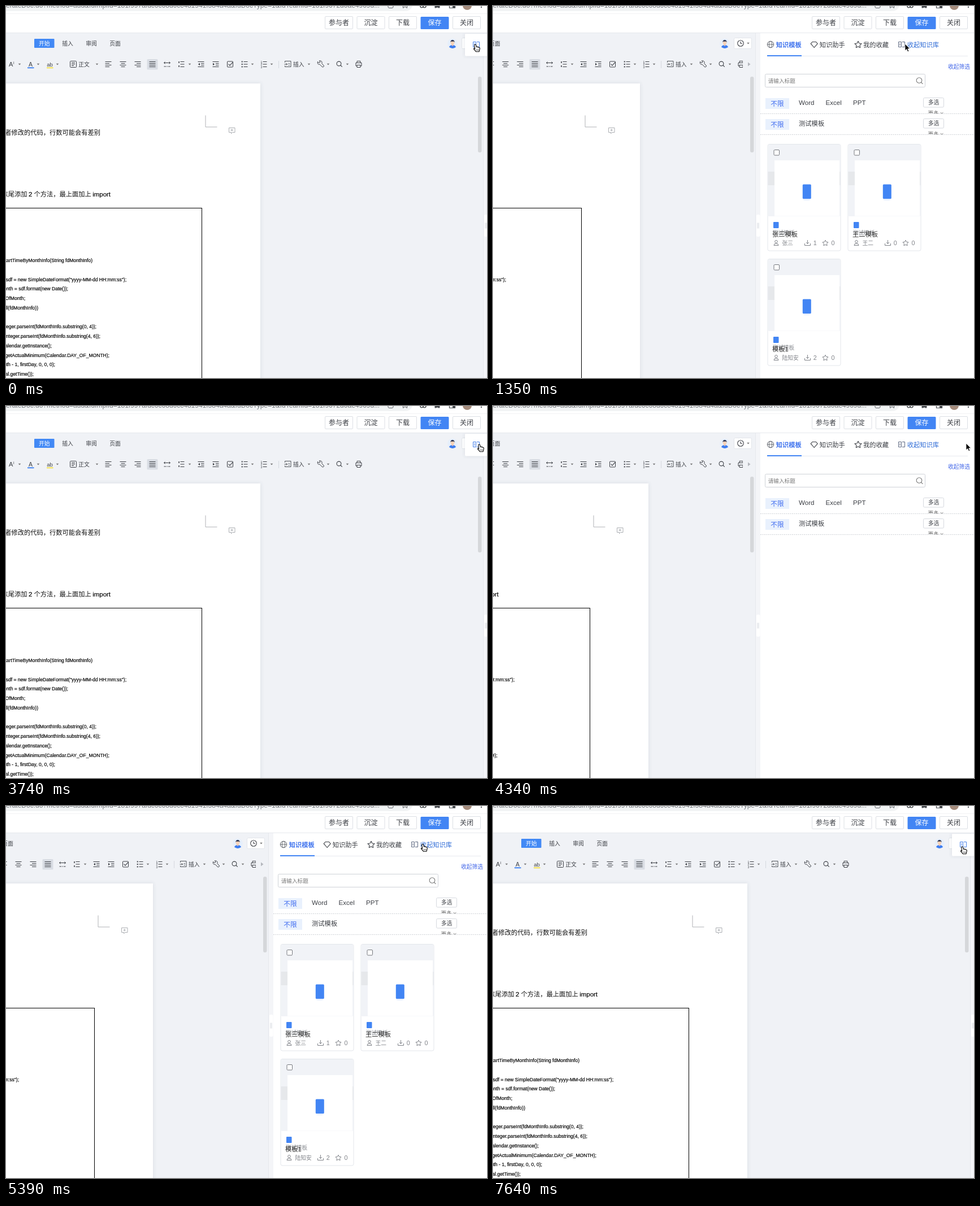
These frames come from a looping animation (851 by 658 pixels, 8 s). An HTML page:

```html
<!DOCTYPE html>
<html lang="zh-CN">
<head>
<meta charset="utf-8">
<title>文档编辑</title>
<style>
html, body { margin: 0; width: 100%; height: 100%; overflow: hidden; background: #fff; }
svg { display: block; width: 851px; height: 658px; }
text { font-family: "Liberation Sans", "Noto Sans CJK SC", "Noto Sans CJK", sans-serif; white-space: pre; }
.code text { stroke: #000; stroke-width: .18px; }
</style>
</head>
<body>
<svg id="stage" viewBox="0 0 851 658" xmlns="http://www.w3.org/2000/svg"></svg>
<script>
const BLUE = '#4285f4', INK = '#3c3f45';

const rect = (x, y, w, h, fill, more = '') =>
  `<rect x="${x}" y="${y}" width="${w}" height="${h}" fill="${fill}" ${more}/>`;
const line = (d, color = INK, w = 1, more = '') =>
  `<path d="${d}" fill="none" stroke="${color}" stroke-width="${w}" ${more}/>`;
const ring = (x, y, r, color = INK, w = 1) =>
  `<circle cx="${x}" cy="${y}" r="${r}" fill="none" stroke="${color}" stroke-width="${w}"/>`;
const text = (x, y, size, s, fill = INK, anchor = 'start', weight = 400) =>
  `<text x="${x}" y="${y}" font-size="${size}" fill="${fill}" text-anchor="${anchor}" font-weight="${weight}">${
    s.replace(/&/g, '&amp;')}</text>`;
const mid = (x, y, size, s, fill, weight) => text(x, y, size, s, fill, 'middle', weight);
const group = (id, body) => `<g id="${id}">${body}</g>`;
const at = (x, y, body) => `<g transform="translate(${x} ${y})">${body}</g>`;
const caret = (x, y = 103) => `<path d="M${x - 2.3} ${y - 1.3}h4.6l-2.3 2.8z" fill="#777"/>`;
const bars = (x, rows, color) => line(rows.map(([y, a, b]) => `M${x + a} ${y}H${x + b}`).join(''), color, 1.1);

function star(x, y, r, color, w = 1) {
  let d = '';
  for (let i = 0; i < 10; i++) {
    const a = i * Math.PI / 5 - Math.PI / 2, k = i % 2 ? r * 0.5 : r;
    d += `${i ? 'L' : 'M'}${(x + k * Math.cos(a)).toFixed(2)} ${(y + k * Math.sin(a)).toFixed(2)}`;
  }
  return line(d + 'z', color, w, 'stroke-linejoin="round"');
}
const lens = (x, y, r, color = INK, w = 1.1) =>
  ring(x, y, r, color, w) + line(`M${x + r * .7} ${y + r * .7}l3 3`, color, w);
const bookIcon = (x, y, color) =>
  line(`M${x - 5.5} ${y - 4.5}h5v9h-5zM${x + 1} ${y - 4.5}h4.5v9h-4.5M${x - 3} ${y - 2}v4`, color);

// browser strip and header
function header() {
  const url = 'erateDoc.do?method=add&fdImplId=181f997afdc6c68d6cc481941f384a4a&fdDocType=1&fdTeamId=181f9672d0ae4969d...';
  const buttons = [[564, '参与者'], [620.5, '沉淀'], [677, '下载'], [733.5, '保存'], [790, '关闭']];
  return rect(0, 0, 851, 48, '#fff')
    + '<path d="M0 0H719Q716 9 706 9H0z" fill="#f1f3f4"/>'
    + text(0, 2.8, 12, url, '#7a7d82')
    + line('M676 0v1.500q0 2 2 2h5q2 0 2-2V0', '#5f6368')
    + line('M702.5 0v3.500l3.500-2.300l3.500 2.300V0', '#5f6368')
    + line('M733 0v1a2.600 2.600 0 0 0 5 0V0M738 0v1a2.600 2.600 0 0 0 5 0V0', '#3c4043', 1.4)
    + '<path d="M758.500 0h9v3.500h-3a1.700 1.700 0 0 0-3 0h-3z" fill="#4a4d51"/>'
    + line('M784.500 0v3.500h10V0', '#4a4d51', 1.2) + rect(790, 0, 4, 3, '#4a4d51')
    + '<circle cx="816" cy="-1" r="8" fill="#a58c7c"/><circle cx="841" cy="2" r="1.200" fill="#5f6368"/>'
    + line('M0 13.500H851', '#f3f3f4')
    + buttons.map(([x, s]) => s === '保存'
      ? rect(x, 19, 50, 22, BLUE, 'rx="1.500"') + mid(x + 25, 34, 12, s, '#fff', 500)
      : rect(x + .5, 18.5, 49, 22, '#fff', 'rx="1.500" stroke="#dcdfe4"') + mid(x + 25, 34, 12, s)).join('')
    + line('M0 47.500H851', '#e6e8ec');
}

function tabs() {
  return rect(50, 58, 35.5, 16, '#4289f5', 'rx="1"')
    + mid(67.7, 69.6, 9.8, '开始', '#fff')
    + [[109, '插入'], [151, '审阅'], [193, '页面']].map(([x, s]) => mid(x, 69.6, 9.8, s)).join('');
}

function tools() {
  const rows = [98.5, 101.5, 104.5, 107.5];
  const align = (x, a, b) => bars(x, rows.map((y, i) => i % 2 ? [y, a, b] : [y, -5.5, 5.5]));
  const indent = (x, d) => bars(x, rows.map((y, i) => [y, i % 3 ? 0 : -5.5, 5.5]))
    + `<path d="M${x - 3.5 - d * 1.5} 100.800v4.400l${d * 3} -2.200z" fill="${INK}"/>`;
  const listRows = [98.5, 103, 107.5];
  const list = x => bars(x, listRows.map(y => [y, -1.5, 5.5]));
  const dots = x => listRows.map(y => rect(x - 5.3, y - 1, 2, 2, INK)).join('');
  return text(5, 107, 11, 'A') + text(13, 103, 7, 'i') + caret(24)
    + mid(43.5, 106.5, 10.5, 'A') + rect(38, 108.3, 11.5, 2, BLUE) + caret(57)
    + mid(77.5, 106.5, 9.5, 'ab') + rect(72, 108.3, 11.5, 2, '#f5e04c') + caret(91)
    + rect(113.5, 97.5, 11, 11, 'none', `rx="1" stroke="${INK}"`)
    + bars(119, [[100.5, -3, 3], [103, -3, 3], [105.5, -3, 1]])
    + text(128.2, 106.6, 9.8, '正文') + caret(161)
    + align(181, -5.5, 2) + align(207, -3.5, 3.5) + align(233, -2, 5.5)
    + rect(249.5, 94, 19, 18.5, '#d9dde4', 'rx="1.500"') + align(259, -5.5, 5.5)
    + line('M279.500 100.500h11M281.500 98.500l-2 2l2 2M288.500 98.500l2 2l-2 2')
    + bars(285, [[107, -5.5, -2], [107, -.8, .8], [107, 2, 5.5]])
    + list(310) + line('M306 98v3M306 108v-3', INK, 1.5) + caret(325)
    + indent(345, -1) + indent(371, 1)
    + rect(391.5, 98, 10, 10, 'none', `rx="1" stroke="${INK}"`) + line('M393.500 102.700l2.500 2.500l5-5.500', INK, 1.1)
    + list(422) + dots(422) + caret(436)
    + list(456) + [1, 2, 3].map((n, i) => text(450.5, 100.7 + i * 4.5, 5, '' + n)).join('') + caret(470)
    + line('M482.500 97v13', '#d5d8de')
    + line('M493.500 100v-2.500h10.500v10h-10.500v-2M492.500 103h5M495.800 101.200l1.800 1.800l-1.800 1.800M499.500 101.500h2.500M499.500 104.500h2.500', INK, .9)
    + text(508, 106.6, 9.8, '插入') + caret(536)
    + line('M551.500 98.500l2.500 2.500l2 -2l-2 -2q4 -1 5 2q.3 1.500 -.3 2.500l4 4.500q-1 2.500 -3 2l-4.300 -4.500q-4 .5 -4.200 -3.500z') + caret(570)
    + lens(589, 102, 3.9) + caret(604)
    + line('M621 100v-2.500h6v2.500M621 106h-2v-5.500h10v5.500h-2M621 104.500h6v4h-6z');
}

function doc() {
  const thin = (x, y, s, anchor) => text(x, y, 11.25, s, '#111', anchor, 300);
  const code = [
    [0, 153, 'getStartTimeByMonthInfo(String fdMonthInfo)'],
    [2, 213, 'SimpleDateFormat sdf = new SimpleDateFormat("yyyy-MM-dd HH:mm:ss");'],
    [3, 110, 'String month = sdf.format(new Date());'],
    [4, 34, 'Date firstDayOfMonth;'],
    [5, 57, 'isNotNull(fdMonthInfo))'],
    [7, 160, 'Integer.parseInt(fdMonthInfo.substring(0, 4));'],
    [8, 167, 'Integer.parseInt(fdMonthInfo.substring(4, 6));'],
    [9, 81, 'Calendar.getInstance();'],
    [10, 183, 'cal.getActualMinimum(Calendar.DAY_OF_MONTH);'],
    [11, 87, 'month - 1, firstDay, 0, 0, 0);'],
    [12, 49, 'sdf.format(cal.getTime());']
  ];
  const body = text(40, 336.5, 11.4, '2', '#000') + text(153.3, 336.5, 11.4, 'import', '#000')
    + code.map(([i, x, s]) => text(x, 453.2 + i * 16.75, 8.55, s, '#000', 'end')).join('');
  return rect(-200, 137, 650, 540, '#fff', 'filter="url(#soft)"')
    + line('M353 193.500V214H373.500', '#b0b2b6')
    + line('M394.500 215.500h10.500v8h-4.500l-2 2.200v-2.200h-4z M399.700 217.300v4.400M397.500 219.500h4.400', '#a3a6ab', .9)
    + thin(167, 227.7, '者修改的代码，行数可能会有差别', 'end')
    + thin(37.5, 336.5, '末尾添加', 'end') + thin(49.5, 336.5, '个方法，最上面加上')
    + rect(-200, 357.5, 546.5, 400, 'none', 'stroke="#000"')
    + `<g class="code">${body}</g>`;
}

// pieces that travel with the right edge of the editor
function side() {
  const avatar = '<circle r="9" fill="#e6effb"/><path d="M-6 6.300Q-5 2.500 0 2.500T6 6.300Q0 10.500 -6 6.300z" fill="#3d7df0"/>'
    + '<path d="M-1.500 1h3v2l-1.500 1.500l-1.500-1.500z" fill="#f3c4a8"/><circle cy="-1.500" r="3.300" fill="#f8d2b8"/>'
    + '<path d="M-3.600 -2Q-4 -6.500 .3 -6.500Q4 -6 3.600 -2L2.500 -4Q-1 -3.500 -2.600 -4z" fill="#26314f"/>';
  return at(790, 66.5, avatar)
    + rect(806.5, 56.5, 31, 19, '#fff', 'rx="2" stroke="#e2e5ea"')
    + ring(818, 66, 5.3, INK, 1.1) + line('M818 63v3.300h3', INK, 1.1) + caret(831.5, 66)
    + rect(835, 125, 6.5, 134, '#d5d7da', 'rx="3"')
    + rect(844.5, 48, 8.5, 610, '#f4f5f8') + line('M844.500 48V658', '#e6e8ed')
    + rect(846, 369, 6.5, 39, '#fff', 'rx="2"')
    + line('M848 383.500v10M850 383.500v10', '#cfd2d8', .8);
}

function toggle() {
  return rect(812, 49, 45, 39.5, '#fff', 'rx="2" filter="url(#soft)"') + bookIcon(832, 68, '#4a83ea');
}

function filterRow(y, body) {
  return rect(482, y + 163, 42, 19, '#e9f1fd') + mid(503, y + 177, 11.7, '不限', '#3f6cf0') + body
    + rect(761.5, y + 162.5, 36, 16.5, '#fff', 'rx="2" stroke="#d6d9df"') + mid(779.7, y + 174.3, 9.7, '多选')
    + `<g clip-path="url(#row${y})">` + text(769.5, y + 193, 9.6, '更多', '#666') + '</g>'
    + line(`M791.500 ${y + 188.3}l2.500 1.700l2.500-1.700`, '#888')
    + line(`M473 ${y + 190.5}H851`, '#cdd0d5', 1, 'stroke-dasharray="2 1.500"');
}

function panel() {
  const globe = ring(491, 68, 5.7, '#5c6068') + '<ellipse cx="491" cy="68" rx="2.600" ry="5.700" fill="none" stroke="#5c6068" stroke-width=".9"/>'
    + line('M485.300 68h11.400', '#5c6068', .9);
  const kinds = [[541, 'Word'], [588.5, 'Excel'], [637, 'PPT']].map(([x, s]) => text(x, 175, 11.6, s)).join('');
  return rect(473, 48, 378, 610, '#fff')
    + line('M485 88.500H840', '#e8eaee') + rect(485, 87, 61, 2, BLUE)
    + globe + text(500.8, 72.5, 11.25, '知识模板', '#3f73ee', 'start', 600)
    + line('M565 63.500h6.500l2.700 3.200l-6 6.800l-6-6.800z', INK, 1.1) + text(577.8, 72.5, 11.25, '知识助手', INK, 'start', 500)
    + star(646, 68.5, 6.3, INK, 1.1) + text(655, 72.5, 11.25, '我的收藏', INK, 'start', 500)
    + bookIcon(723, 68, '#5c6780') + text(732.7, 72.5, 11.25, '收起知识库', '#2e6bd6')
    + text(805, 110.5, 9.75, '收起筛选', '#3f64e8')
    + rect(481.5, 120.5, 283, 23, '#fff', 'rx="2" stroke="#cfd2d8"')
    + text(486.7, 136, 9.65, '请输入标题', '#777') + lens(754, 131.5, 4.8, '#777')
    + filterRow(0, kinds) + filterRow(37, text(541, 212, 11.3, '测试模板'));
}

function card(x, y, title, name, loads) {
  const grey = '#808389';
  return at(x, y, rect(.5, .5, 129, 188.5, '#fff', 'rx="3" stroke="#e3e6eb"')
    + rect(1, 1, 128, 127, '#f1f3f7', 'rx="2"')
    + rect(1, 49, 128, 24, '#e6e8eb') + rect(12.5, 29, 115, 98.5, '#fff')
    + rect(11.5, 10.5, 9.5, 9.5, '#fff', 'rx="1.500" stroke="#74777c"')
    + '<ellipse cx="69.500" cy="98" rx="7" ry="2" fill="#eaf1fd"/>'
    + rect(62.3, 71.5, 15, 25.5, BLUE, 'rx="1.500"') + rect(10.5, 138, 9.5, 11, BLUE, 'rx="1"')
    + text(9, 160.5, 9.7, '测试模板', '#8b8e93') + text(8.5, 163.5, 11.25, title, '#333')
    + ring(15.5, 172.8, 2.3, grey) + line('M11.500 179.500q0-3.500 4-3.500t4 3.500z', grey)
    + text(26, 179, 9.75, name, grey)
    + line('M71 170v6.500M68.500 174l2.500 2.500l2.500-2.500M66 176v3.500h10v-3.500', grey)
    + text(81.3, 179, 10.8, loads, grey) + star(102.5, 175.5, 5.3, grey) + text(113, 179, 10.8, '0', grey));
}

const ARROW = '<path d="M0 0V12L2.800 9.400L4.800 13.800L6.800 13L4.900 8.700H8.600z" fill="#000" stroke="#fff" stroke-width=".8"/>';
const HAND = at(.8, .3, '<path d="M3 .8C4.500 .5 4.800 1.500 5 2.500L5.500 5C6.500 4.300 7.300 4.800 7.600 5.400C8.500 4.800 9.400 5.200 9.700 6C11 5.600 11.600 6.500 11.500 8L10.800 11.200L10.200 13.500H4.600C3.500 11.500 2 10.300 .8 8.800C.2 7.600 1.500 7 2.800 8.200L1.900 2.600C1.700 1.600 2 .9 3 .8z" fill="#fff" stroke="#000" stroke-width="1.100"/>'
  + line('M5.500 9.500v2M7.300 9.500v2M9 9.500v2', '#000', .7));

document.getElementById('stage').innerHTML = `<defs>
  <filter id="soft" x="-10%" y="-10%" width="120%" height="120%"><feDropShadow dx="0" dy="0" stdDeviation="3" flood-color="#505a6e" flood-opacity=".16"/></filter>
  <clipPath id="bar"><rect id="barBox" y="88" height="30"/></clipPath>
  <clipPath id="row0"><rect x="760" y="184" width="40" height="6"/></clipPath>
  <clipPath id="row37"><rect x="760" y="221" width="40" height="6"/></clipPath></defs>`
  + rect(0, 48, 851, 610, '#f0f2f6')
  + group('doc', doc()) + group('tabs', tabs())
  + `<g clip-path="url(#bar)">${group('tools', tools())}</g>`
  + group('more', '<path d="M451 99.500v7l4.500-3.500z" fill="#b4b7bd"/>')
  + group('side', side()) + group('toggle', toggle()) + group('panel', panel())
  + group('cards', card(485.5, 244, '张三模板', '张三', '1') + card(627.5, 244, '王二模板', '王二', '0')
    + card(485.5, 447, '模板1', '陆知安', '2'))
  + header()
  + group('arrow', ARROW) + group('hand', HAND);

const el = {};
for (const id of ['doc', 'tabs', 'tools', 'more', 'side', 'toggle', 'panel', 'cards', 'arrow', 'hand', 'barBox'])
  el[id] = document.getElementById(id);
const show = (id, on) => el[id].setAttribute('visibility', on ? 'visible' : 'hidden');
const move = (id, x, y = 0) => el[id].setAttribute('transform', `translate(${x} ${y})`);

// time, pointer, x, y, glides to the next key
const KEYS = [
  [0, 'hand', 826, 67], [150, 'arrow', 830, 66, 1], [1050, 'arrow', 725, 65], [1350, 'arrow', 729, 67],
  [1500, 'hand', 735, 67.5], [1790, 'hand', 736, 67.5], [2240, 'hand', 741, 67.5],
  [2840, 'arrow', 752, 68, 1], [3590, 'arrow', 837, 67], [3740, 'hand', 833, 67],
  [4340, 'arrow', 837, 66, 1], [5240, 'arrow', 731, 67], [5390, 'hand', 733, 66.5],
  [7190, 'arrow', 750, 68, 1], [7640, 'hand', 826, 71]
];
const OPEN = [[150, 2690], [4340, 7040]], STEP = 150, LOOP = 8000;

function pointer(t) {
  const i = KEYS.findLastIndex(k => k[0] <= t);
  let [t0, kind, x, y, glide] = KEYS[i];
  if (glide) {
    const [t1, , x1, y1] = KEYS[i + 1];
    const p = Math.floor((t - t0) / STEP) * STEP / (t1 - t0), e = p * p * (3 - 2 * p);
    x += (x1 - x) * e;
    y += (y1 - y) * e;
  }
  show('arrow', kind === 'arrow');
  show('hand', kind === 'hand');
  move(kind, x, y);
}

function draw(t) {
  const span = OPEN.find(([a, b]) => t >= a && t < b);
  const age = span ? t - span[0] : 0;
  move('doc', span ? (age < STEP ? -175 : -190) : 0);
  move('tabs', span ? -190 : 0);
  move('tools', span ? -185 : 0);
  move('side', span ? -380 : 0);
  el.barBox.setAttribute('width', span ? 442 : 851);
  show('more', span);
  show('panel', span);
  show('toggle', !span);
  show('cards', span && age >= 2 * STEP);
  pointer(t);
}

function tick(now) {
  draw(now % LOOP);
  requestAnimationFrame(tick);
}
draw(0);
requestAnimationFrame(tick);
</script>
</body>
</html>
```
